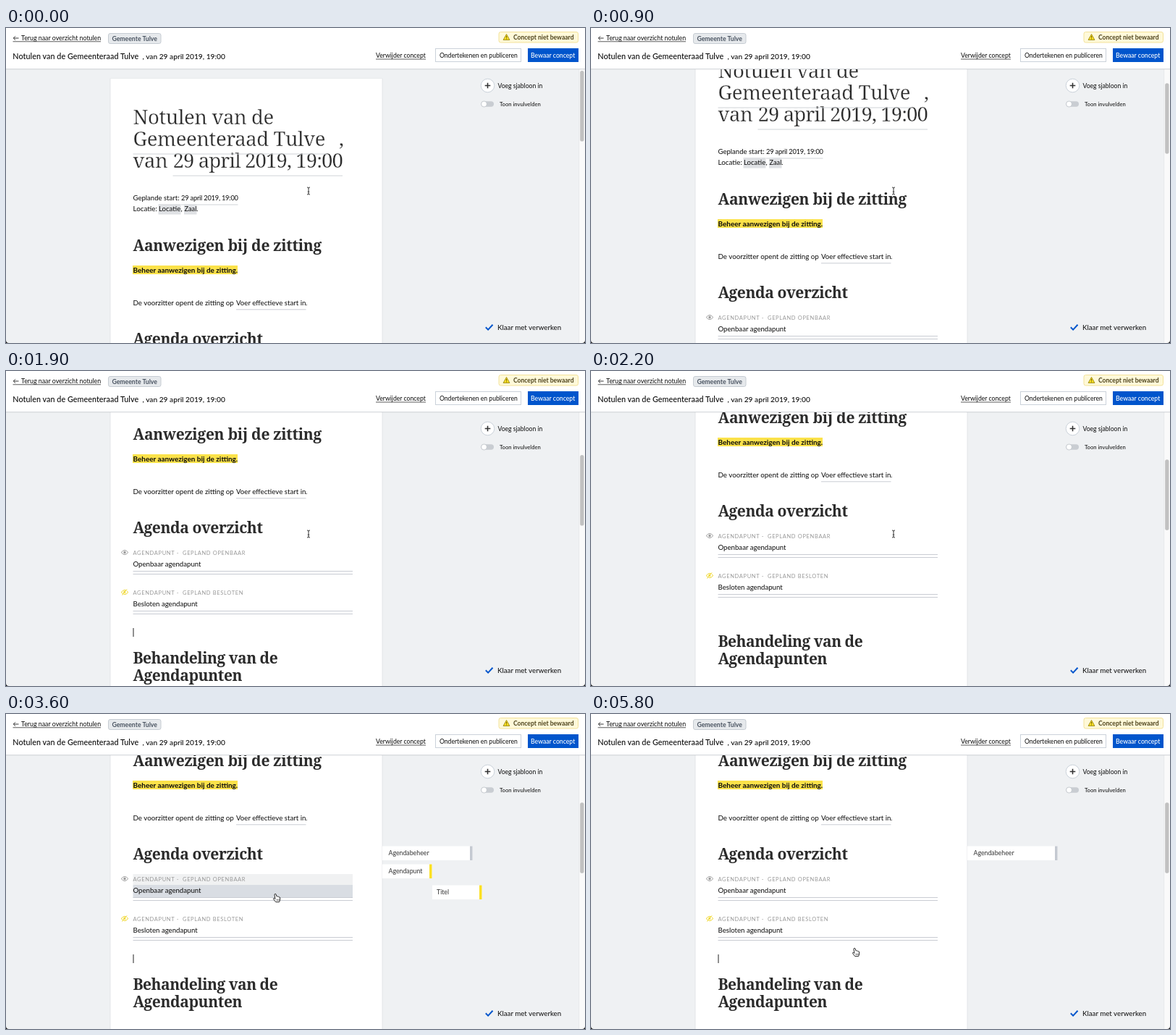
Recreate the animation shown at these times as an HTML page. Size 800 by 435 pixels, loop 6 s.

```html
<!DOCTYPE html>
<html lang="nl">
<head>
<meta charset="utf-8">
<title>Notulen</title>
<style>
  html, body { margin: 0; width: 100%; height: 100%; overflow: hidden; background: #eff1f3; }
  svg { display: block; width: 800px; height: 435px; }
  text { font-family: Lato, sans-serif; fill: #0c0c0c; white-space: pre; }
  .title { font-family: "Noto Serif", serif; font-weight: 300; font-size: 27.5px; fill: #2b2b2b; stroke: #fff; stroke-width: .35px; }
  .head { font-family: "Noto Serif", serif; font-weight: 700; font-size: 21px; fill: #2b2b2b; }
  .bold { font-weight: 700; }
  .medium { font-weight: 500; }
  .label { font-size: 7.5px; letter-spacing: .65px; fill: #999; }
  .date { font-size: 9.3px; letter-spacing: -.22px; }
</style>
</head>
<body>
<svg id="stage" viewBox="0 0 800 435" xmlns="http://www.w3.org/2000/svg"></svg>
<script>
const LOOP = 6000, STEP = 100;

// Time, scroll offset
const SCROLL = [[0, 0], [200, 5], [600, 33], [1300, 105], [1600, 151], [1900, 213], [2100, 236]];

// Time, pointer x, pointer y
const POINTER = [
  [2300, 418, 225], [2600, 398, 237], [2900, 382, 243], [3300, 378, 246], [3700, 372, 257],
  [4000, 366, 291], [4300, 363, 309], [5100, 364, 311], [5400, 366, 327], [5600, 366, 329]
];

const text = (x, y, size, str, cls = '', extra = '') =>
  `<text x="${x}" y="${y}" font-size="${size}" class="${cls}" ${extra}>${str}</text>`;
const rect = (x, y, w, h, fill, extra = '') =>
  `<rect x="${x}" y="${y}" width="${w}" height="${h}" fill="${fill}" ${extra}/>`;
const spaced = n => `letter-spacing="${n}"`;
const group = (id, body, extra = '') => `<g id="${id}" ${extra}>${body}</g>`;

const eye = (y, color, slash) => `
  <g transform="translate(164 ${y})" fill="none" stroke="${color}">
    <path d="M-4.8 0Q0-6 4.8 0Q0 6-4.8 0Z"/>
    <circle r="1.7" fill="${color}" stroke="none"/>
    ${slash ? '<path d="M-2.4 4L4-4" stroke="#fff"/><path d="M-3.4 4L3-4"/>' : ''}
  </g>`;

const agendaItem = (id, y, kind, name, closed) =>
  group(id + 'Head', rect(175.5, y - 7, 303.5, 15, '#f0f1f2')) +
  group(id + 'Title', rect(175.5, y + 8, 303.5, 18, '#d9dde3')) +
  eye(y - .5, closed ? '#efd51f' : '#9a9a9a', closed) +
  text(175.5, y + 3, 7.5, 'AGENDAPUNT -', 'label') +
  text(244, y + 3, 7.5, kind, 'label') +
  text(175.5, y + 18.5, 9.65, name) +
  rect(175.5, y + 25, 303.5, 1, '#c9ccd3') +
  rect(175.5, y + 29, 303.5, 1, '#c9ccd3');

const tag = (id, x, y, w, bar, label, tx) =>
  group(id, rect(x, y, w, 19.5, '#fff') + rect(x + w - 3.5, y, 3.5, 19.5, bar) +
    text(tx, y + 12.8, 8.77, label, '', 'style="fill:#333"'));

const page =
  rect(143.5, 69.5, 377, 900, '#e2e5e8') + rect(144.5, 70, 375, 900, '#fff') +
  text(175.5, 133, 27.5, 'Notulen van de', 'title', spaced(-.4)) +
  text(175.5, 163, 27.5, 'Gemeenteraad Tulve', 'title', spaced(-.4)) +
  text(460, 163, 27.5, ',', 'title') +
  text(175.5, 193, 27.5, 'van', 'title', spaced(-.5)) +
  text(230.5, 193, 27.5, '29 april 2019, 19:00', 'title', spaced(-.9)) +
  rect(175.5, 173.5, 268, 1, '#d0d3d8') + rect(230.5, 203.5, 234.5, 1, '#d0d3d8') +
  text(175.5, 238, 9.55, 'Geplande start:') +
  text(242, 238, 9.3, '29 april 2019, 19:00', 'date') +
  rect(242, 243.5, 78.5, 1, '#d0d3d8') +
  rect(210.5, 243, 31, 14.5, '#dfe1e4') + rect(246, 243, 17.5, 14.5, '#dfe1e4') +
  text(175.5, 253.3, 9.8, 'Locatie:') + text(211, 253.3, 9.6, 'Locatie') +
  text(241.5, 253.3, 9.6, ',') + text(246.5, 253.3, 9.2, 'Zaal') + text(263.3, 253.3, 9.6, '.') +
  text(175.5, 307.5, 21, 'Aanwezigen bij de zitting', 'head', spaced(-.28)) +
  rect(175, 328, 145, 12, '#fbe24a') +
  text(175.5, 337.8, 9.95, 'Beheer aanwezigen bij de zitting.', 'bold') +
  text(175.5, 382.8, 9.78, 'De voorzitter opent de zitting op') +
  text(318, 382.8, 9.7, 'Voer effectieve start in') + text(414, 382.8, 9.7, '.') +
  rect(318, 388.3, 96.5, 1, '#c9ccd3') +
  text(175.5, 437, 21, 'Agenda overzicht', 'head', spaced(-.4)) +
  agendaItem('open', 464, 'GEPLAND OPENBAAR', 'Openbaar agendapunt', false) +
  agendaItem('closed', 519, 'GEPLAND BESLOTEN', 'Besloten agendapunt', true) +
  group('caret', rect(175.5, 568, 1, 12, '#222')) +
  text(175.5, 616.5, 21, 'Behandeling van de', 'head', spaced(-.5)) +
  text(175.5, 641, 21, 'Agendapunten', 'head', spaced(-.4));

const tags =
  tag('manageTag', 520, 182.5, 124.5, '#c4c9d1', 'Agendabeheer', 528.5) +
  tag('itemTag', 520, 207.5, 68.5, '#fbe024', 'Agendapunt', 528.5) +
  tag('titleTag', 589, 236.5, 68.5, '#fbe024', 'Titel', 595);

const sidebar = `
  <circle cx="665.5" cy="79.5" r="9.3" fill="#fff" stroke="#cbd2da"/>
  <path d="M665.5 75.7v7.6M661.7 79.5h7.6" stroke="#333" stroke-width="1.6"/>
  ${text(679.5, 83, 8.6, 'Voeg sjabloon in')}
  ${rect(656.5, 101.3, 17.5, 7.4, '#c9cdd2', 'rx="3.7"')}
  <circle cx="660.5" cy="105" r="4" fill="#fff" stroke="#b9bec5" stroke-width=".8"/>
  ${text(682, 108, 7.65, 'Toon invulvelden')}
  <path d="M662.8 413.3l3.3 3.3 6.4-6.8" fill="none" stroke="#05c" stroke-width="2"/>
  ${text(679, 416.5, 9.74, 'Klaar met verwerken')}`;

const header = `
  ${rect(0, 57, 800, 1, '#000', 'opacity=".04"')}
  ${rect(0, 56, 800, 1, '#d8dbdf')}
  ${rect(0, 0, 800, 56, '#fff')}
  <path d="M17.5 14H10.3M13 11.3L10.3 14l2.7 2.7" fill="none" stroke="#222" stroke-width=".9"/>
  ${text(21, 17, 8.84, 'Terug naar overzicht notulen')}
  ${rect(9.5, 18.4, 121.5, .8, '#333')}
  ${rect(141.5, 7.5, 72.5, 14, '#e6e9ec', 'rx="2.5" stroke="#c6ccd3"')}
  ${text(177.7, 17.5, 8.7, 'Gemeente Tulve', 'bold', 'text-anchor="middle" style="fill:#4b5562"')}
  ${text(9.3, 43, 10.75, 'Notulen van de Gemeenteraad Tulve', 'medium', spaced(.06))}
  ${text(188.5, 43, 10.2, ', van 29 april 2019, 19:00', 'medium')}
  ${text(511, 41, 8.67, 'Verwijder concept')}
  ${rect(511, 42.6, 69, .8, '#333')}
  ${rect(593.5, 28.5, 118, 18, '#fff', 'stroke="#cbd2da"')}
  ${text(599, 40.8, 8.62, 'Ondertekenen en publiceren')}
  ${rect(721, 28, 70, 19, '#0055cc')}
  ${text(725, 40.8, 8.7, 'Bewaar concept', 'medium', 'style="fill:#fff"')}
  ${rect(681, 5.5, 109.5, 14.5, '#fff9d9', 'rx="2.5" stroke="#f3e29a"')}
  <path d="M691.5 8.6l4.4 7.8h-8.8z" fill="#fbe024" stroke="#8a7600" stroke-width=".8" stroke-linejoin="round"/>
  <path d="M691.5 11v2.6M691.5 14.4v1" stroke="#5b4e00" stroke-width=".9"/>
  ${text(701, 16, 8.55, 'Concept niet bewaard', 'bold', 'style="fill:#4d431c"')}`;

const pointers = `
  <g id="beam" fill="none" stroke="#333" transform="translate(418 225)">
    <path d="M-2-5Q0-5 0-3.8Q0-5 2-5M0-4V4M-2 5Q0 5 0 3.8Q0 5 2 5M-1.2 1.2H1.2"/>
  </g>
  <g id="hand">
    <path d="M-2.8-5.2Q-1.8-6.2-.9-5.1L-.1-2.2Q1-2.8 1.6-1.8Q2.6-2.3 3.2-1.2Q4.5-1.4 4.7 0
      L4.5 3L3.6 5.6H-1.3L-4.5 1.5Q-4.6 0-3.2.5L-2 1.4L-3-4Z"
      fill="#fff" stroke="#222" stroke-width=".95" stroke-linejoin="round"/>
    <path d="M0 1.7V4M1.6 1.7V4M3.1 1.7V4" stroke="#222" stroke-width=".6"/>
  </g>`;

const stage = document.getElementById('stage');
stage.innerHTML = `
  <clipPath id="view"><rect y="57" width="792" height="378"/></clipPath>
  ${rect(0, 0, 800, 435, '#eff1f3')}
  <g clip-path="url(#view)">${group('page', page)}</g>
  ${tags}${sidebar}
  ${rect(792, 57, 8, 378, '#fafafa')}${rect(791.5, 57, .7, 378, '#e3e5e8')}
  ${group('thumb', rect(793.2, 59, 5.3, 97.5, '#c1c1c1', 'rx="2.6"'))}
  ${header}
  <path d="M0 431v4h4Q0 435 0 431ZM800 431v4h-4Q800 435 800 431Z" fill="#111"/>
  ${pointers}`;

const part = {};
stage.querySelectorAll('g[id]').forEach(g => part[g.id] = g);

const show = (id, on) => part[id].setAttribute('visibility', on ? 'visible' : 'hidden');
const move = (id, x, y) => part[id].setAttribute('transform', `translate(${x} ${y})`);

function sample(keys, t, col) {
  const i = keys.findIndex(k => k[0] > t);
  if (i === 0) return keys[0][col];
  if (i < 0) return keys[keys.length - 1][col];
  const a = keys[i - 1], b = keys[i];
  return a[col] + (b[col] - a[col]) * (t - a[0]) / (b[0] - a[0]);
}

function draw(t) {
  const scroll = Math.round(sample(SCROLL, t, 1));
  move('page', 0, -scroll);
  move('thumb', 0, scroll * .268);

  const active = t >= 2400;
  const x = Math.round(sample(POINTER, t, 1)), y = Math.round(sample(POINTER, t, 2));
  move('hand', x, y);
  show('hand', active);
  show('beam', !active);

  const tip = y - 5;
  const open = active && tip < 257;
  const closed = active && tip >= 275 && tip < 313;
  const openTitle = open && tip >= 236;
  const closedTitle = closed && tip >= 291;
  show('openHead', open);
  show('openTitle', openTitle);
  show('closedHead', closed);
  show('closedTitle', closedTitle);

  show('manageTag', active);
  show('itemTag', open || closed);
  show('titleTag', openTitle || closedTitle);
  move('itemTag', 0, closed ? 55 : 0);
  move('titleTag', 0, closed ? 55 : 0);

  show('caret', (t + 400) % 1000 < 500);
}

function tick() {
  const t = performance.now() % LOOP;
  draw(Math.floor(t / STEP) * STEP);
  requestAnimationFrame(tick);
}
tick();
</script>
</body>
</html>
```
